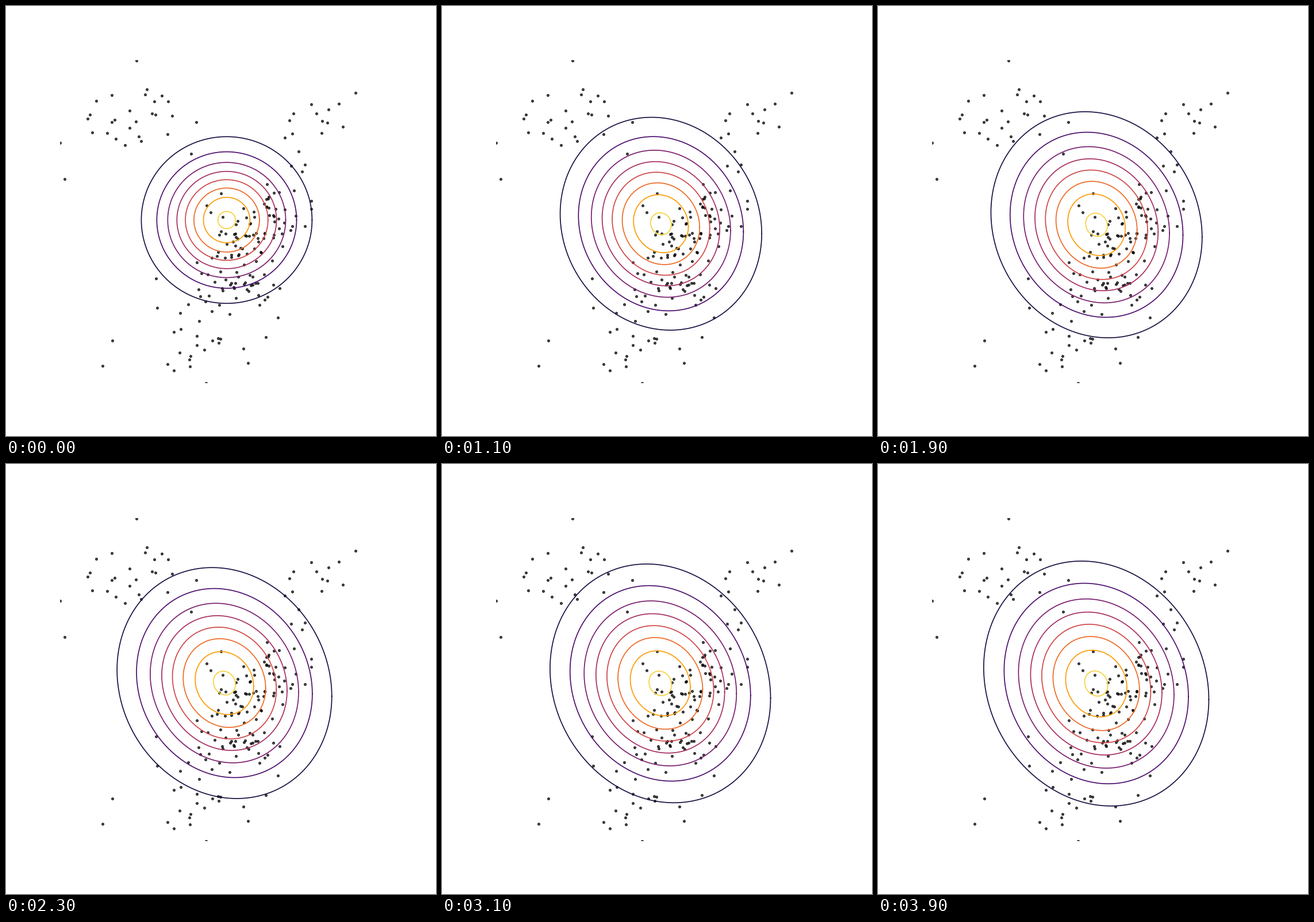
These frames come from a looping animation (748 by 748 pixels, 4 s). A matplotlib script:

```python
import numpy as np
import matplotlib.pyplot as plt
from matplotlib.animation import FuncAnimation

SIZE = 748
DPI = 100
FRAMES = 40
INTERVAL = 100
PX = 72 / DPI  # points per pixel
MARGIN = SIZE / 8

# Point clouds in stage pixels: count, mean and spread in x and y.
CLUSTERS = [
    (39, (475, 358), (27, 38)),
    (40, (400, 400), (30, 28)),
    (44, (392, 485), (44, 26)),
    (27, (196, 194), (48, 44)),
    (14, (528, 222), (45, 34)),
    (23, (336, 583), (48, 36)),
]
# Outermost points, which set the extent of the data.
EXTREMES = [(227.5, 95), (94, 238), (102, 300.5), (168, 625.5),
            (348, 656), (608.5, 150.5)]

LEVELS = np.arange(1, 9)
PEAK = 8.18  # density peak in units of one contour step
RADII = np.sqrt(np.log(PEAK / LEVELS) / np.log(PEAK))
ANGLE = np.linspace(0, 2 * np.pi, 181)


def scatter_points():
    rng = np.random.default_rng(4)
    clouds = [rng.normal(mean, spread, (n, 2)) for n, mean, spread in CLUSTERS]
    return np.vstack(clouds + [EXTREMES])


def ellipse(t):
    """Outer contour at step t: offsets from the centre, and the centre."""
    cx = 383.9 - 4.3 * (1 - np.exp(-t / 9))
    cy = 372.3 + 9.8 * (1 - np.exp(-t / 10.3))
    half_w = 148.5 + 19.14 * np.log1p(t / 3.6)
    half_h = 145 + 25.16 * np.log1p(t / 2.8)
    rho = 0.0305 * np.log1p(t / 0.55)
    dx = half_w * np.cos(ANGLE)
    dy = half_h * (rho * np.cos(ANGLE) + np.sqrt(1 - rho**2) * np.sin(ANGLE))
    return dx, dy, cx, cy


fig = plt.figure(figsize=(SIZE / DPI, SIZE / DPI), dpi=DPI, facecolor="white")
ax = fig.add_axes([0.125, 0.125, 0.75, 0.75])
ax.set_xlim(MARGIN, SIZE - MARGIN)
ax.set_ylim(SIZE - MARGIN, MARGIN)
ax.axis("off")

points = scatter_points()
ax.scatter(points[:, 0], points[:, 1], s=(3.9 * PX) ** 2, c="black",
           alpha=0.7, linewidths=1.2 * PX, zorder=1)

colors = plt.get_cmap("inferno")(LEVELS / 9)
lines = [ax.plot([], [], color=c, lw=1.7 * PX, zorder=2)[0] for c in colors]


def update(frame):
    dx, dy, cx, cy = ellipse(frame)
    for line, r in zip(lines, RADII):
        line.set_data(cx + r * dx, cy + r * dy)
    return lines


anim = FuncAnimation(fig, update, frames=FRAMES, interval=INTERVAL,
                     repeat=True, repeat_delay=0)
plt.show()
```
